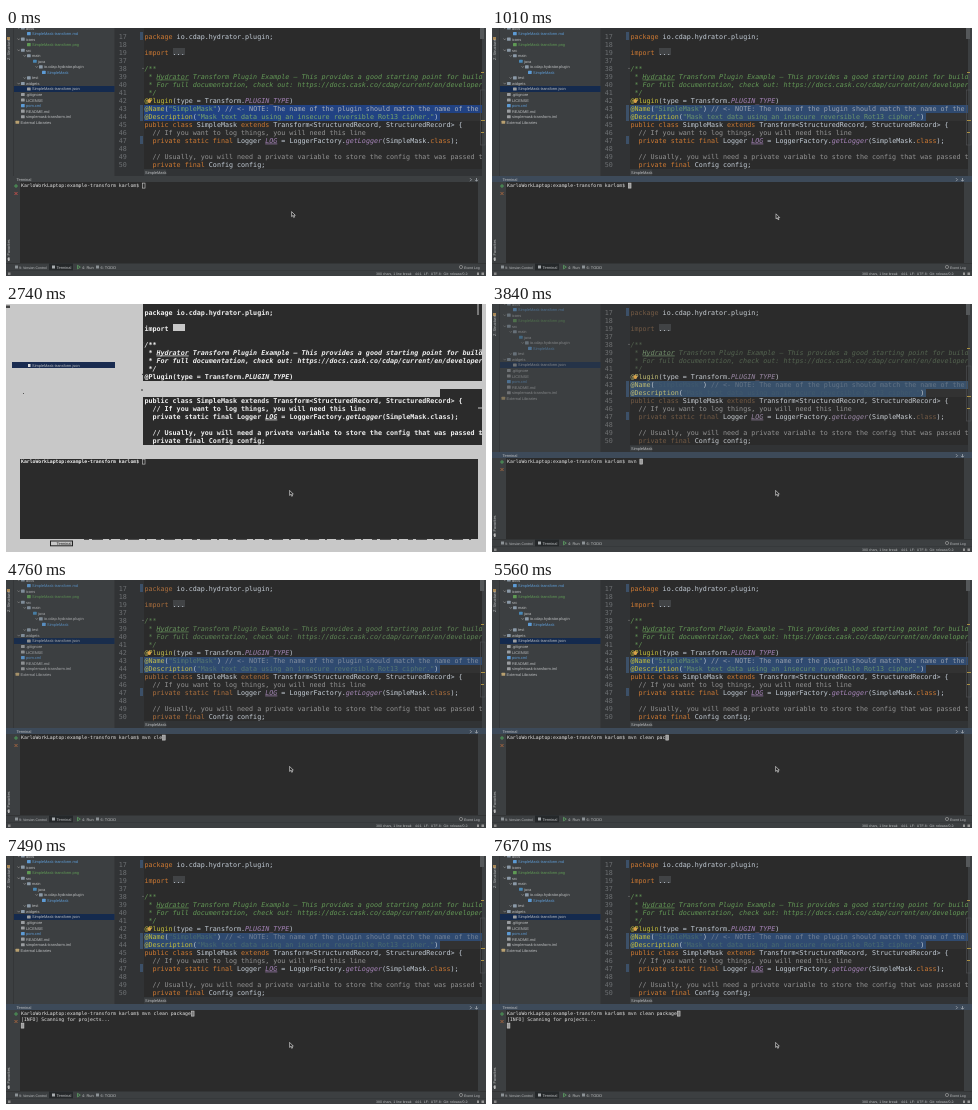
Animation of 480 by 248 pixels, one loop 8 s. Source, as an HTML page:

```html
<!DOCTYPE html>
<html lang="en">
<head>
<meta charset="utf-8">
<title>Building a plugin in the IDE terminal</title>
<style>
html, body { margin: 0; width: 100%; height: 100%; overflow: hidden; background: #2b2b2b }
svg { display: block; width: 100vw; height: 100vh; --str: 1; --dim: 1; --sel: #214283; --head: #3c3f41 }
text { white-space: pre; text-rendering: geometricPrecision }
.code { font: 6.69px "DejaVu Sans Mono", monospace; fill: #c3ccd6; filter: saturate(var(--dim)) }
.term { font: 4.79px "DejaVu Sans Mono", monospace; fill: #e2e2e2 }
.ui { font: 3.95px "Liberation Sans", sans-serif; fill: #bdbfc1 }
.small { font-size: 3.5px }
.num { fill: #6c6f72 }
.k { fill: #cc7832; fill-opacity: var(--dim) }
.c { fill: #929292 }
.d { fill: #629755; font-style: italic; fill-opacity: var(--dim) }
.u { fill: #629755; font-style: italic; text-decoration: underline }
.y { fill: #c3bd3a }
.i { fill: #a583b8; font-style: italic }
.v { fill: #a583b8; font-style: italic; text-decoration: underline }
.s { fill: #78a56a; fill-opacity: var(--str) }
.n { fill: #a9aeb6; fill-opacity: calc(.3 + .7 * var(--str)) }
.side { opacity: var(--dim) }
.broken { display: none }
.glitch .broken { display: inline }
.glitch .norm { display: none }
.glitch .code, .glitch .code tspan, .glitch .term { fill: #eee; fill-opacity: 1; font-weight: bold }
</style>
</head>
<body>
<script>
const LOOP = 8000, CHAR = 2.884, TERM_X = 15;
const PROMPT = 'KarloWorkLaptop:example-transform karlom$ ';
const COMMAND = 'mvn clean package';

const rect = (x, y, x2, y2, fill, more = '') =>
  `<rect x="${x}" y="${y}" width="${x2 - x}" height="${y2 - y}" fill="${fill}" ${more}/>`;
const text = (x, y, s, cls, more = '') => `<text x="${x}" y="${y}" class="${cls}" ${more}>${s}</text>`;
const group = (cls, ...parts) => `<g class="${cls}">${parts.join('')}</g>`;
const path = (d, stroke, width = .8) => `<path d="${d}" fill="none" stroke="${stroke}" stroke-width="${width}"/>`;

// x[...] marks a run of class x
const paint = s => s.replace(/(\w)\[(.*?)\]/g, '<tspan class="$1">$2</tspan>');

const code = [
  [17, 'k[package] io.cdap.hydrator.plugin;'],
  [18, ''],
  [19, 'k[import] ...'],
  [37, ''],
  [38, 'd[/**]'],
  [39, 'd[ * ]u[Hydrator]d[ Transform Plugin Example – This provides a good starting point for building]'],
  [40, 'd[ * For full documentation, check out: https://docs.cask.co/cdap/current/en/developer-m]'],
  [41, 'd[ */]'],
  [42, 'y[@Plugin](type = Transform.i[PLUGIN_TYPE])'],
  [43, 'y[@Name](s["SimpleMask"]) n[// &lt;- NOTE: The name of the plugin should match the name of the docs]'],
  [44, 'y[@Description](s["Mask text data using an insecure reversible Rot13 cipher."])'],
  [45, 'k[public class] SimpleMask k[extends] Transform&lt;StructuredRecord, StructuredRecord> {'],
  [46, '  c[// If you want to log things, you will need this line]'],
  [47, '  k[private static final] Logger v[LOG] = LoggerFactory.i[getLogger](SimpleMask.k[class]);'],
  [48, ''],
  [49, '  c[// Usually, you will need a private variable to store the config that was passed to]'],
  [50, '  k[private final] Config config;']
];

const FOLDER = '#8b9aa8', FILE = '#9a9da0', BLUE = '#5d9bd5', GREEN = '#5f9a55';
const tree = [
  [20, 'docs', FOLDER], [26, 'SimpleMask-transform.md', BLUE], [20, 'icons', FOLDER],
  [26, 'SimpleMask-transform.png', GREEN], [20, 'src', FOLDER], [26, 'main', FOLDER], [32, 'java', '#4a88b5'],
  [38, 'io.cdap.hydrator.plugin', FOLDER], [41, 'SimpleMask', BLUE], [26, 'test', FOLDER],
  [20, 'widgets', FOLDER], [26, 'SimpleMask-transform.json', FILE], [20, '.gitignore', FILE],
  [20, 'LICENSE', FILE], [20, 'pom.xml', BLUE], [20, 'README.md', FILE],
  [20, 'simplemask-transform.iml', FILE], [14.5, 'External Libraries', '#b8a070']
];

const treeRows = tree.map(([x, name, color], i) => {
  const y = .1 + i * 5.54;
  const arrow = color === FOLDER ? path(`M${x - 8.5} ${y - .7}l1.2 1.4l1.2 -1.4`, '#999', .6) : '';
  const tint = color === BLUE || color === GREEN ? `style="fill:${color}"` : '';
  return arrow + rect(x - 5, y - 1.6, x - 1.3, y + 1.5, color, 'rx=".5"') + text(x, y + 1.4, name, 'ui', tint);
}).join('');

const codeRows = code.map(([n, s], i) => {
  const y = 10.6 + i * 8;
  return group(n === 43 || n === 44 ? 'norm' : '', text(138.4, y, paint(s), 'code')) +
    group('norm', text(112.8, y, `<tspan class="num">${n}</tspan>`, 'code'));
}).join('');

const changed = (y, y2) => rect(134, y, 137, y2, '#3c5068');

const normalBack = group('norm',
  rect(0, 0, 480, 248, '#3c3f41'), rect(7.5, 0, 8, 148, '#2d2f30'),
  rect(108.5, 0, 138, 141, '#313335'), rect(138, 0, 476, 141, '#2b2b2b'),
  changed(4, 12), changed(77, 93), changed(108, 116),
  rect(167, 20, 179, 27, '#414345'),
  rect(138, 85, 476, 93, '#323232'),
  rect(138, 77, 476, 85, 'var(--sel)'), rect(138, 85, 434, 93, 'var(--sel)'),
  rect(108.5, 141, 476, 148, '#313335'), rect(138, 141.5, 160, 147.5, '#3b3e40'),
  rect(0, 148, 480, 154, 'var(--head)'),
  rect(14, 154, 472, 235, '#2b2b2b'),
  rect(0, 235, 480, 235.5, '#2b2b2b'), rect(43, 235.5, 67, 242.5, '#25282a'),
  rect(0, 242.5, 480, 243, '#303234'));

const normalFront = group('norm',
  group('side', rect(8, 58, 108.5, 64, '#142a4e'), treeRows),
  `<circle cx="143.3" cy="73" r="1.9" fill="#d8a14a"/>`,
  path('M136 40.4h2', '#777', .6),
  rect(476, 0, 480, 148, '#3c3f41'),
  rect(474, 0, 478, 11, '#55585a'), rect(474.5, 62, 479, 117, 'none', 'stroke="#505355" stroke-width=".6"'),
  path('M475 44.5h3M475 92.5h4M475 104.5h3', '#b89b45', .9),
  text(139, 146, 'SimpleMask', 'ui'),
  text(10.5, 152.5, 'Terminal', 'ui'),
  path('M464 150.2l1.5 1.5l-1.5 1.5M470.5 150v3M469 151.8l1.5 1.5l1.5 -1.5', '#aeb4ba', .7),
  path('M8 158h4M10 156v4', '#4fa05a', .9),
  `<path id="close" d="M8.5 164l3 3M11.5 164l-3 3" fill="none" stroke-width=".9"/>`,
  rect(1, 9, 4, 12, '#a88755'),
  text(0, 0, 'Z: Structure', 'ui', 'transform="translate(3.7 32) rotate(-90)"'),
  text(0, 0, '2: Favorites', 'ui', 'transform="translate(3.7 232) rotate(-90)"'),
  rect(2, 229.5, 3.5, 233, '#bbb'),
  rect(9, 237.5, 12, 240.5, '#8c9296'), text(13, 240.7, '9: Version Control', 'ui small'),
  rect(46, 237.5, 49, 240.5, '#a9adb0'), text(50.5, 240.7, 'Terminal', 'ui'),
  path('M71.5 237.3l2.8 1.8l-2.8 1.8z', '#5ea064'), text(76, 240.7, '4: Run', 'ui'),
  rect(90, 237.5, 93, 240.5, '#8c9296'), text(94.5, 240.7, '6: TODO', 'ui'),
  `<circle cx="455" cy="239" r="1.6" fill="none" stroke="#aaa" stroke-width=".6"/>`,
  text(458, 240.7, 'Event Log', 'ui small'),
  rect(2, 244.5, 4.5, 247, '#888'),
  text(370, 247, '380 chars, 1 line break', 'ui small'),
  text(409, 247, '44:1  LF:  UTF-8:  Git: release/0.2:', 'ui small'),
  rect(471, 244.5, 473, 247, '#999'), rect(475.5, 244.5, 478, 247, '#999'));

const brokenBack = group('broken',
  rect(0, 0, 480, 248, '#c8c8c8'),
  rect(137, 0, 476, 77, '#2b2b2b'), rect(434, 85, 476, 93, '#2b2b2b'), rect(137, 93, 476, 141, '#2b2b2b'),
  rect(14, 155, 472, 235, '#2b2b2b'),
  rect(6, 58, 109, 64, '#192b50'), text(26, 62.6, 'SimpleMask-transform.json', 'ui'), rect(22, 60, 24.5, 63, '#ddd'));

const brokenFront = group('broken',
  rect(167, 20, 179, 27, '#c8c8c8'), rect(476, 0, 480, 148, '#c8c8c8'),
  path('M472 0v11M473 46h3M472 104h4M473 130h3', '#c8c8c8', 1),
  path('M137 38l2 2M136 70l3 2M135 86h2', '#333', 1),
  rect(0, 1.5, 4, 4, '#444'), rect(17, 89, 18, 90, '#555'),
  `<path d="M78 235.3H472" stroke="#333" stroke-width="1" stroke-dasharray="5 3 11 6 2 9"/>`,
  rect(44.5, 237, 66.5, 241.8, 'none', 'stroke="#222"'),
  text(50.5, 240.7, 'Terminal', 'ui', 'style="fill:#222"'));

document.body.innerHTML = `<svg viewBox="0 0 480 248" preserveAspectRatio="none">
  ${normalBack}${brokenBack}${codeRows}${normalFront}${brokenFront}
  <text id="command" class="term" x="${TERM_X}" y="159.3"></text>
  <text id="output" class="term" x="${TERM_X}" y="165.3">[INFO] Scanning for projects...</text>
  <rect id="ghost" y="155.1" width="2.7" height="5" x="${TERM_X + 59 * CHAR + .2}" fill="#777" stroke="#ccc" stroke-width=".6"/>
  <rect id="caret" width="2.7" height="5" stroke="#ccc" stroke-width=".6"/>
  <path id="mouse" d="M0 0v5l1.2 -1l.9 1.9l.9 -.4l-.9 -1.8h1.6z" fill="#222" stroke="#eee" stroke-width=".6"/>
</svg>`;

const svg = document.querySelector('svg');
const el = id => document.getElementById(id);

// Value of the last [time, value] step reached
const at = (steps, t) => steps.filter(([time]) => time <= t).pop()[1];

const FOCUS = 450;
const typed = [[0, 0], [3340, 1], [3660, 3], [3840, 4], [4320, 5], [4470, 6], [4630, 7], [4790, 8], [4940, 9],
  [5240, 11], [5400, 12], [5560, 13], [5740, 14], [5880, 15], [6180, 16], [6340, 17]];
const strings = [[0, 1], [FOCUS, .8], [2890, .1], [4320, .5], [5240, .75], [5880, .85], [7490, .35]];
const dimming = [[0, 1], [2890, .55], [4320, .85], [5240, 1]];
const selection = [[0, '#214283'], [FOCUS, '#2f4a70'], [2890, '#38506a'], [4320, '#2f4a70']];
const header = [[0, '#3c3f41'], [FOCUS, '#3d4a59']];
const glitches = [[0, false], [2300, true], [2890, false], [7010, true], [7490, false]];
const caretRow = [[0, 0], [6500, 1], [7490, 2]];
const travel = [[0, 0], [450, .2], [640, .45], [820, .65], [1010, .8], [1490, .9], [1850, 1]];

function draw(now) {
  const t = now % LOOP;
  const line = PROMPT + COMMAND.slice(0, at(typed, t));
  const row = at(caretRow, t), move = at(travel, t), glitch = at(glitches, t);

  svg.classList.toggle('glitch', glitch);
  svg.style.setProperty('--str', at(strings, t));
  svg.style.setProperty('--dim', at(dimming, t));
  svg.style.setProperty('--sel', at(selection, t));
  svg.style.setProperty('--head', at(header, t));

  el('command').textContent = line;
  el('output').style.display = row === 2 ? '' : 'none';
  el('ghost').style.display = row ? '' : 'none';
  el('caret').setAttribute('x', TERM_X + .2 + (row ? 0 : line.length * CHAR));
  el('caret').setAttribute('y', 155.1 + row * 6);
  el('caret').setAttribute('fill', t < FOCUS || glitch ? '#2b2b2b' : '#999');
  el('close').setAttribute('stroke', t < FOCUS ? '#c9504a' : '#a8673f');
  el('mouse').setAttribute('transform', `translate(${285.6 - 2 * move} ${183.6 + 2.8 * move})`);
  requestAnimationFrame(draw);
}
requestAnimationFrame(draw);
</script>
</body>
</html>
```
